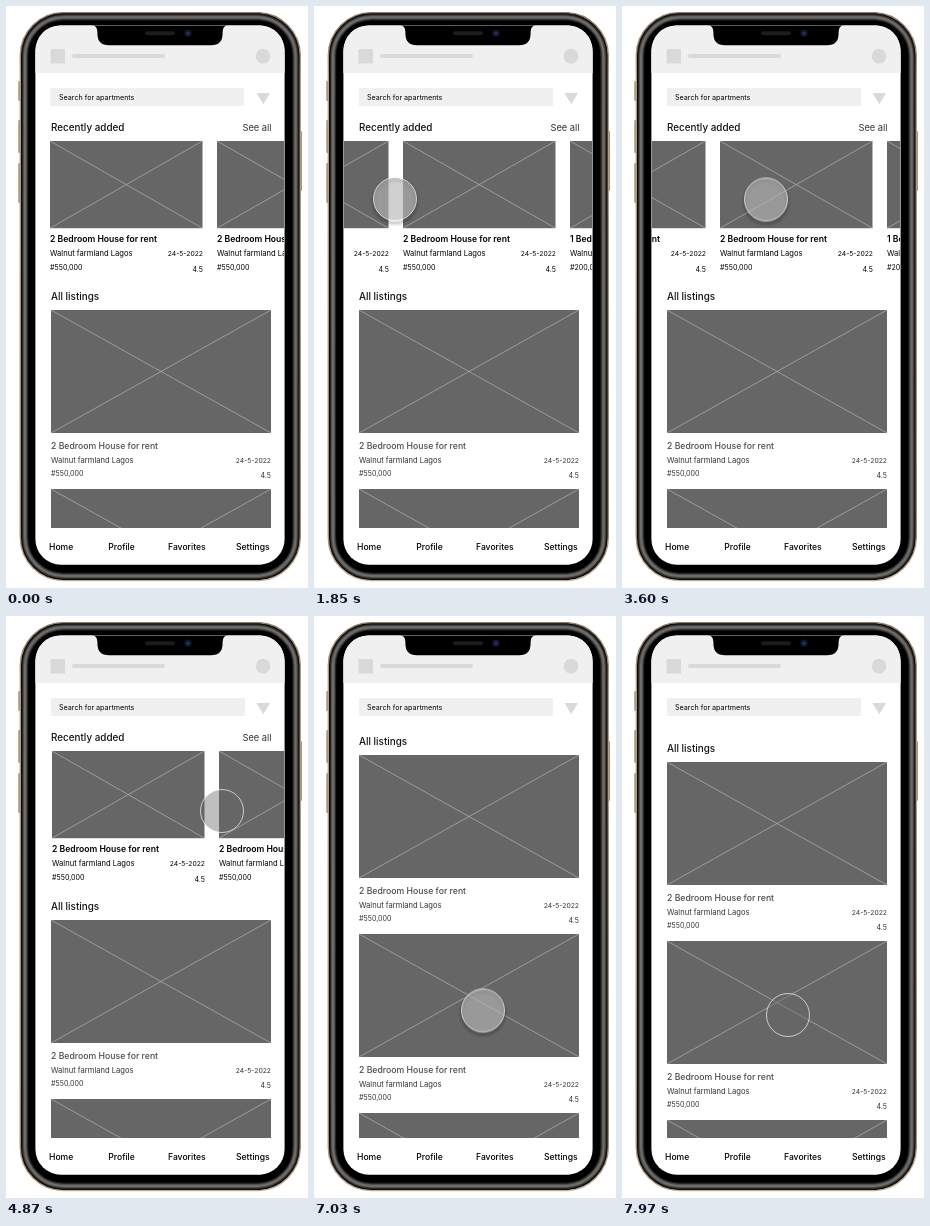
Animation of 302x582 px, one loop 8000 ms. Source, as an HTML page:

```html
<!DOCTYPE html>
<html lang="en">
<head>
<meta charset="utf-8">
<title>Apartment listings</title>
<style>
html, body { margin: 0; width: 100%; height: 100%; overflow: hidden; background: #fff; }
svg { display: block; width: 302px; height: 582px; font-family: Inter, sans-serif; }
.head { font-size: 9.9px; font-weight: 500; fill: #111; }
.title { font-size: 8.65px; font-weight: 600; }
.place { font-size: 7.6px; }
.date { font-size: 6.8px; }
.price { font-size: 7.1px; }
.end { text-anchor: end; }
.nav { font-size: 8.6px; font-weight: 500; }
.list { fill: #333; }
.list .title { fill: #4a4a4a; font-weight: 500; font-size: 8.7px; }
.photo { fill: #666; }
.cross { stroke: #b4b4b4; stroke-width: .7; fill: none; }
.soft { fill: #d9d9d9; }
.pale { fill: #f0f0f0; }

#search, #cards, #page, #touch, #hover, #press { animation: 8s step-end infinite; }
#search { animation-name: settle; }
#cards { animation-name: swipe; }
#page { animation-name: scroll; }
#touch { animation-name: move; }
#hover { animation-name: hover; }
#press { animation-name: press; }

@keyframes settle {
  0% { transform: translate(-1px, 0); }
  1%, 100% { transform: none; }
}
@keyframes swipe {
  0% { transform: translate(-1px, 0); }
  1% { transform: translate(0, 0); }
  15.375% { transform: translate(0, 0); animation-timing-function: steps(8, jump-both); }
  23.125% { transform: translate(-123px, 0); }
  30.125% { transform: translate(-123px, 0); animation-timing-function: steps(2, jump-both); }
  32.25% { transform: translate(-220px, 0); }
  34% { transform: translate(-220px, 0); animation-timing-function: steps(1, jump-both); }
  35.125% { transform: translate(-245px, 0); }
  38.25% { transform: translate(-245px, 0); animation-timing-function: steps(3, jump-both); }
  41% { transform: translate(-114px, 0); }
  49% { transform: translate(-114px, 0); animation-timing-function: steps(5, jump-both); }
  53.75% { transform: translate(-12px, 0); }
  57.75% { transform: translate(-12px, 0); animation-timing-function: steps(3, jump-both); }
  60.875% { transform: translate(1px, 0); }
  64.875% { transform: translate(1px, 0); animation-timing-function: steps(1, jump-both); }
  65.625%, 100% { transform: translate(0, 0); }
}
@keyframes scroll {
  0% { transform: translate(0, 0); }
  76.875% { transform: translate(0, -27px); animation-timing-function: steps(6, end); }
  82.875% { transform: translate(0, -165px); }
  90.125% { transform: translate(0, -165px); animation-timing-function: steps(5, jump-both); }
  94.5% { transform: translate(0, -296px); animation-timing-function: steps(5, end); }
  99.625%, 100% { transform: translate(0, -158px); }
}
@keyframes move {
  0% { transform: translate(268px, 327px); opacity: 0; }
  5.25% { transform: translate(268px, 327px); opacity: .5; }
  6.125% { transform: translate(268px, 327px); opacity: 1; }
  9.875% { transform: translate(211px, 210px); }
  12.5% { transform: translate(205px, 189px); }
  15.375% { transform: translate(205px, 189px); animation-timing-function: steps(8, jump-both); }
  23.125% { transform: translate(81px, 193px); }
  25.125% { transform: translate(81px, 193px); animation-timing-function: steps(2, jump-both); }
  26.875% { transform: translate(207px, 193px); }
  30.125% { transform: translate(207px, 193px); animation-timing-function: steps(2, jump-both); }
  32.25% { transform: translate(110px, 192px); }
  34% { transform: translate(110px, 192px); animation-timing-function: steps(1, jump-both); }
  35.125% { transform: translate(85px, 191px); }
  38.25% { transform: translate(85px, 191px); animation-timing-function: steps(3, jump-both); }
  41% { transform: translate(215px, 189px); }
  45% { transform: translate(144px, 193.5px); animation-timing-function: steps(2, end); }
  47% { transform: translate(97px, 199px); }
  49% { transform: translate(97px, 199px); animation-timing-function: steps(5, jump-both); }
  53.75% { transform: translate(203px, 197px); }
  57.75% { transform: translate(203px, 197px); animation-timing-function: steps(3, jump-both); }
  60.875% { transform: translate(216px, 195px); }
  69.75% { transform: translate(216px, 195px); animation-timing-function: steps(2, jump-both); }
  71.75% { transform: translate(179px, 408px); }
  76.875% { transform: translate(179px, 373px); animation-timing-function: steps(6, end); }
  82.875% { transform: translate(182px, 241px); }
  86.75% { transform: translate(182px, 241px); animation-timing-function: steps(1, jump-both); }
  87.875% { transform: translate(169px, 394.5px); }
  90.125% { transform: translate(169px, 394.5px); animation-timing-function: steps(5, jump-both); }
  94.5% { transform: translate(167px, 262px); animation-timing-function: steps(5, end); }
  99.625%, 100% { transform: translate(166px, 399px); opacity: 1; }
}
@keyframes hover {
  0%, 23.125%, 43%, 64.875%, 85% { opacity: 1; }
  15.375%, 30.125%, 49%, 75%, 90.125%, 100% { opacity: 0; }
}
@keyframes press {
  0%, 23.125%, 43%, 64.875%, 85% { opacity: 0; }
  15.375%, 30.125%, 49%, 75%, 90.125%, 100% { opacity: 1; }
}
</style>
</head>
<body>
<svg viewBox="0 0 302 582">
  <defs>
    <linearGradient id="gold" x2="0" y2="1">
      <stop offset="0" stop-color="#8d7c6b"/>
      <stop offset=".12" stop-color="#b7a18a"/>
      <stop offset=".9" stop-color="#9c8772"/>
      <stop offset="1" stop-color="#c4b09a"/>
    </linearGradient>
    <clipPath id="screen"><rect x="29.4" y="19.4" width="249.2" height="539.4" rx="25.5"/></clipPath>
    <clipPath id="view"><rect x="30" y="108" width="248" height="414"/></clipPath>
    <filter id="shade" x="-30%" y="-30%" width="160%" height="160%"><feGaussianBlur stdDeviation="1.6"/></filter>
    <filter id="sheen"><feGaussianBlur stdDeviation="1.1"/></filter>

    <g id="card">
      <rect class="photo" y="135" width="152.5" height="87.2"/>
      <path class="cross" d="M0 135 152.5 222.2M152.5 135 0 222.2"/>
      <text class="place" y="249.8">Walnut farmland Lagos</text>
      <text class="date end" x="153" y="249.8">24-5-2022</text>
      <text class="price end" x="153" y="265.9">4.5</text>
    </g>
    <g id="home">
      <use href="#card"/>
      <text class="title" y="236.1">2 Bedroom House for rent</text>
      <text class="price" y="263.7">#550,000</text>
    </g>
    <g id="listing" class="list">
      <rect class="photo" x="45" y="304" width="220" height="123"/>
      <path class="cross" d="M45 304 265 427M265 304 45 427"/>
      <text class="title" x="45" y="442.7">2 Bedroom House for rent</text>
      <text class="place" x="45" y="456.8">Walnut farmland Lagos</text>
      <text class="date end" x="265" y="456.8">24-5-2022</text>
      <text class="price" x="45" y="470.2">#550,000</text>
      <text class="price end" x="265" y="472.3">4.5</text>
    </g>
  </defs>

  <!-- phone body -->
  <g fill="#a5917c">
    <rect x="12.3" y="75" width="2.5" height="20" rx="1"/>
    <rect x="12.3" y="114" width="2.5" height="33" rx="1"/>
    <rect x="12.3" y="157" width="2.5" height="40" rx="1"/>
    <rect x="293.5" y="125" width="2.5" height="60" rx="1"/>
  </g>
  <rect x="14.3" y="6.6" width="280" height="568" rx="43" fill="#000" stroke="url(#gold)" stroke-width="1.4"/>
  <rect x="19" y="11.3" width="270.6" height="558.6" rx="38.5" fill="none" stroke="#787673" stroke-width="4" filter="url(#sheen)"/>
  <rect x="22.8" y="15" width="263" height="551" rx="34" fill="#000"/>

  <g clip-path="url(#screen)">
    <rect x="29" y="19" width="250" height="540" fill="#fff"/>
    <g clip-path="url(#view)">
      <g id="page">
        <text class="head" x="45" y="125">Recently added</text>
        <text class="end" x="265.6" y="125" font-size="9.3" fill="#333">See all</text>
        <g id="cards">
          <use href="#home" x="45"/>
          <use href="#home" x="212"/>
          <g transform="translate(379 0)">
            <use href="#card"/>
            <text class="title" y="236.1">1 Bedroom House for rent</text>
            <text class="price" y="263.7">#200,000</text>
          </g>
        </g>
        <text class="head" x="45" y="294.4">All listings</text>
        <use href="#listing"/>
        <use href="#listing" y="179"/>
        <use href="#listing" y="358"/>
      </g>
    </g>

    <rect class="pale" x="29" y="19" width="250" height="48"/>
    <g class="soft">
      <rect x="44.5" y="43" width="14.5" height="14.5"/>
      <rect x="66" y="48" width="93" height="4" rx="2"/>
      <circle cx="257" cy="50.2" r="7.4"/>
      <path d="M250.5 87H264L257.3 98.3Z"/>
    </g>
    <g id="search">
      <rect class="pale" x="45" y="82" width="194" height="18"/>
    </g>
    <text x="53" y="94" font-size="7.15">Search for apartments</text>

    <g class="nav">
      <text x="43" y="544.2">Home</text>
      <text x="102.3" y="544.2">Profile</text>
      <text x="162" y="544.2">Favorites</text>
      <text x="230" y="544.2">Settings</text>
    </g>
    <path d="M86 19Q91.4 20 91.4 26V27.5Q91.4 39.3 103 39.3H205Q216.6 39.3 216.6 27.5V26Q216.6 20 222 19Z"/>
  </g>
  <rect x="139" y="25.3" width="30" height="4" rx="2" fill="#1d1d1f"/>
  <circle cx="182" cy="27.2" r="3.6" fill="#11162b"/>
  <circle cx="182" cy="27.2" r="1.5" fill="#27376b"/>

  <g id="touch">
    <g id="hover">
      <circle cy="2.5" r="21.5" fill="none" stroke="#000" stroke-opacity=".35" stroke-width="2" filter="url(#shade)"/>
      <circle r="21.5" fill="#b6b6b6" fill-opacity=".64"/>
    </g>
    <circle id="press" r="21.5" fill="#666" fill-opacity=".42"/>
    <circle r="21.5" fill="none" stroke="#fff" stroke-width=".8" stroke-opacity=".85"/>
  </g>
</svg>
</body>
</html>
```
